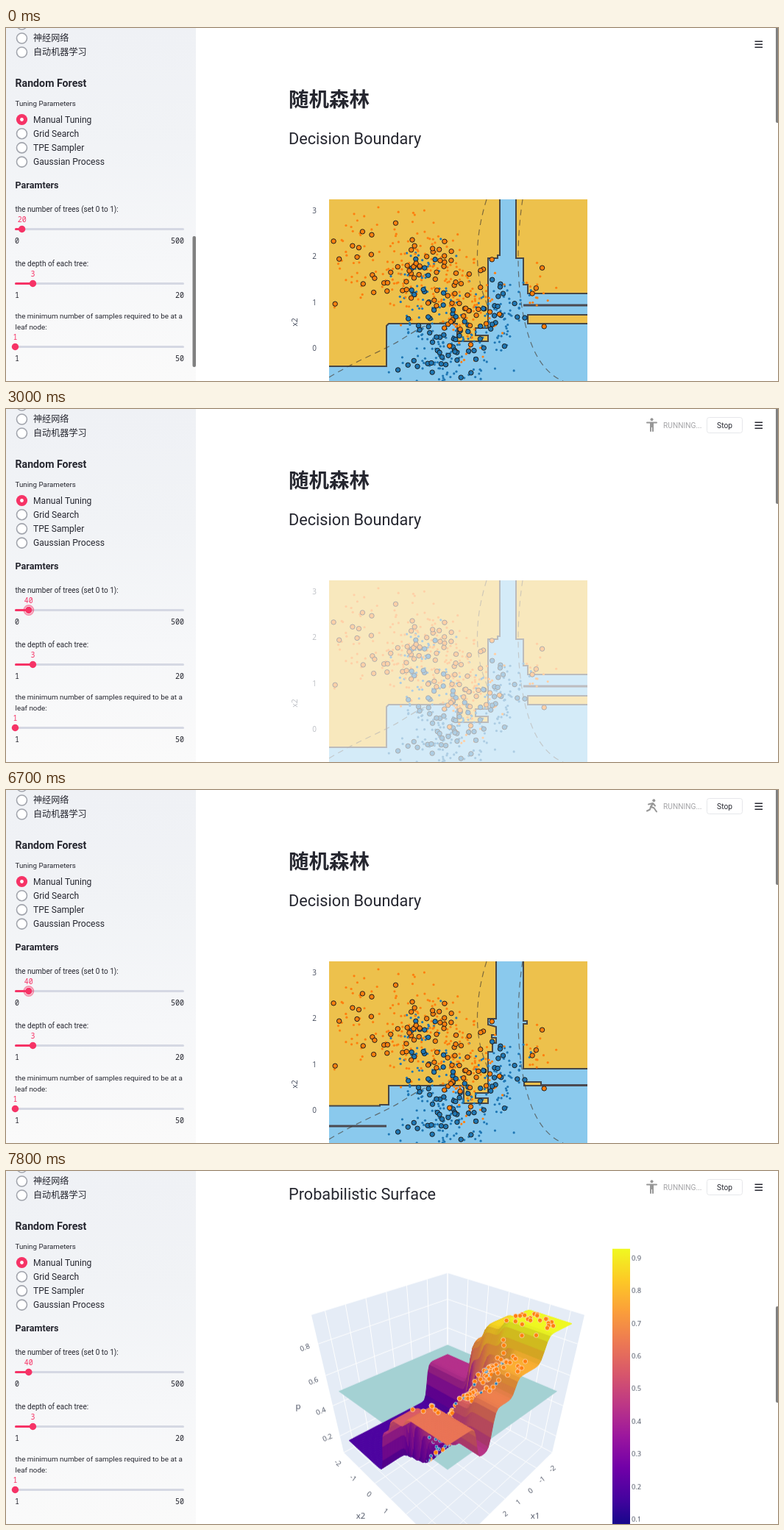
These frames come from a looping animation (1049x480 px, 8 s). An HTML page with a canvas:

```html
<!DOCTYPE html>
<html lang="en">
<head>
<meta charset="utf-8">
<title>Random Forest Tuning</title>
<style>
  html, body { margin: 0; width: 100%; height: 100%; overflow: hidden; background: #fff; }
  canvas { display: block; }
</style>
</head>
<body>
<canvas id="stage" width="1049" height="480"></canvas>
<script>
const W = 1049, H = 480, LOOP = 8000;
const stage = document.getElementById('stage').getContext('2d');
const PINK = '#f63366', INK = '#262730', AXIS = '#444b5c';
const ORANGE = '#ff7f0e', BLUE = '#1f77b4';
const SANS = 'Roboto, sans-serif', MONO = '"Noto Sans Mono", monospace';
const CJK = '"Noto Sans CJK SC", "Noto Sans CJK", sans-serif', PLOT = '"Open Sans", sans-serif';

const mix = (a, b, k) => a + (b - a) * k;
const range = (from, to, step) => Array.from({ length: Math.floor((to - from) / step) + 1 }, (_, i) => from + i * step);

// y is the vertical centre of the capitals
function text(g, str, x, y, size, { family = SANS, weight = 400, color = INK, align = 'left', turn = 0 } = {}) {
  g.save();
  g.translate(x, y);
  g.rotate(turn * Math.PI / 180);
  g.font = `${weight} ${size}px ${family}`;
  g.fillStyle = color;
  g.textAlign = align;
  g.fillText(str, 0, size * 0.36);
  g.restore();
}
function poly(g, points, fill, stroke) {
  g.beginPath();
  for (const [x, y] of points) g.lineTo(x, y);
  g.closePath();
  if (fill) { g.fillStyle = fill; g.fill(); }
  if (stroke) { g.strokeStyle = stroke; g.lineWidth = 1; g.stroke(); }
}
function strokePath(g, d, color, width) {
  g.strokeStyle = color;
  g.lineWidth = width;
  g.stroke(new Path2D(d));
}
function disc(g, x, y, r, fill, stroke, width = 1) {
  g.beginPath();
  g.arc(x, y, r, 0, 7);
  if (fill) { g.fillStyle = fill; g.fill(); }
  if (stroke) { g.strokeStyle = stroke; g.lineWidth = width; g.stroke(); }
}
function bar(g, x, y, w, h, r, fill, stroke) {
  g.beginPath();
  g.roundRect(x, y, w, h, r);
  if (fill) { g.fillStyle = fill; g.fill(); }
  if (stroke) { g.strokeStyle = stroke; g.lineWidth = 1; g.stroke(); }
}
function ramp(g, y0, y1, colors) {
  const grad = g.createLinearGradient(0, y0, 0, y1);
  colors.forEach((c, i) => grad.addColorStop(i / (colors.length - 1), c));
  return grad;
}
function cached(draw) {
  const c = document.createElement('canvas');
  c.width = W;
  c.height = 680;
  draw(c.getContext('2d'));
  return c;
}

// ---- samples: seeded clouds, every fourth one is a large ringed marker ----
let seed = 4711;
const random = () => (seed = (seed * 16807) % 2147483647) / 2147483647;
const gauss = () => Math.sqrt(-2 * Math.log(random())) * Math.cos(2 * Math.PI * random());
const cloud = (color, count, cx, cy, sx, sy) => range(1, count, 1)
  .map(i => ({ color, large: i % 4 === 0, x: cx + sx * gauss(), y: cy + sy * gauss() }));
const samples = [
  ...cloud(BLUE, 220, 598, 430, 32, 38), ...cloud(BLUE, 55, 560, 350, 18, 38), ...cloud(BLUE, 70, 676, 385, 15, 34),
  ...cloud(ORANGE, 165, 558, 328, 30, 36), ...cloud(ORANGE, 130, 628, 375, 18, 34),
  ...cloud(ORANGE, 45, 475, 312, 18, 28), ...cloud(ORANGE, 18, 722, 365, 10, 24)
];

// ---- decision boundary ----
const LEFT = 439, TOP = 233, SIDE = 351, BOTTOM = 592;
const before = {
  edges: ['439 460H517V405L520 402H613V426H655V418H638V408H655V313H668V309H671V233',
    '693 233V313H703V349H709V361H790', '790 390H709V402H790'],
  bars: 'M703 377H790'
};
const after = {
  edges: ['439 429.5H508V428H520V402H619L622 405V426H655V419H638V412H655V356H661V344H666V337H660V333H666V322L655 319V311H666V233',
    '703 233V314H708V318H703V379H790', '790 401.5H727V397H704V402H790'],
  bars: 'M439 457H517M727 401.5H790'
};

function drawBoundary(g, { edges, bars }) {
  const label = { family: PLOT, color: AXIS, align: 'center' };
  for (let v = 3; v >= -2; v--) text(g, v, 419, 248 + (3 - v) * 62.6, 10, label);
  for (let v = -2; v <= 2; v++) text(g, v, 614 + v * 62.6, BOTTOM + 13, 10, label);
  text(g, 'x2', 392, 400, 10.5, { ...label, turn: -90 });
  text(g, 'x1', 614, BOTTOM + 33, 10.5, label);

  g.beginPath();
  g.rect(LEFT, TOP, SIDE, BOTTOM - TOP);
  g.clip();
  g.fillStyle = '#edc14c';
  g.fillRect(LEFT, TOP, SIDE, BOTTOM - TOP);
  g.fillStyle = '#8ac9ed';
  g.fill(new Path2D(`M${edges.join('L')}V${BOTTOM}H${LEFT}Z`));
  strokePath(g, 'M' + edges.join('M'), '#474747', 2);
  strokePath(g, bars, '#4b4950', 3.2);
  g.setLineDash([8, 6]);
  strokePath(g, 'M653 233C640 275 638 310 643 340S658 375 655 395M439 475C480 450 510 440 535 425S570 400 600 400' +
    'M702 233C697 265 693 315 699 365S720 465 757 480', 'rgba(70,60,50,.65)', 1.2);
  g.setLineDash([]);
  for (const s of samples) if (!s.large) disc(g, s.x, s.y, 1.6, s.color);
  for (const s of samples) if (s.large) disc(g, s.x, s.y, 3.2, s.color, '#1c1c1c');
}

// ---- probability surface ----
const plasma = ['#0d0887', '#46039f', '#7201a8', '#9c179e', '#bd3786', '#d8576b', '#ed7953', '#fb9f3a', '#fdca26', '#f0f921'];
function plasmaAt(p, light) {
  const k = Math.min(8.999, Math.max(0, (p - 0.07) / 0.857 * 9)), i = Math.floor(k);
  const channel = at => mix(...[plasma[i], plasma[i + 1]].map(c => parseInt(c.slice(at, at + 2), 16)), k - i) * light;
  return `rgb(${channel(1)},${channel(3)},${channel(5)})`;
}

// unit cube to screen: a runs back to left, b runs back to right, h runs up
function cube(a, b, h) {
  const blend = (back, left, right, front) => mix(mix(back, left, a), mix(right, front, a), b);
  return [
    mix(blend(600, 459, 742, 600), blend(600, 415, 786, 600), h),
    mix(blend(330, 405, 405, 545), blend(161, 218, 218, 310), h)
  ];
}
const place = (u, v, p) => cube(0.04 + 0.92 * u, 0.04 + 0.92 * v, (p - 0.09) / 0.9);

// sums of soft steps, like an ensemble of shallow trees
const step = (x, at) => 1 / (1 + Math.exp((at - x) / 0.011));
function probability(u, v) {
  const low = 0.43 - 0.25 * step(u, 0.2);
  const high = 0.94 - 0.17 * step(u, 0.2) - 0.11 * step(u, 0.42) - 0.22 * step(u, 0.6) + 0.19 * step(u, 0.74);
  const edge = 0.37 + 0.16 * step(u, 0.22) - 0.16 * step(u, 0.74);
  const rise = 0.6 * step(v, edge) + 0.25 * step(v, edge + 0.1) + 0.15 * step(v, edge + 0.25);
  return mix(low, high, rise);
}

function drawSurface(g) {
  poly(g, [cube(1, 0, 1), cube(0, 0, 1), cube(0, 1, 1), cube(0, 1, 0), cube(1, 1, 0), cube(1, 0, 0)], '#e5ecf6');
  const rule = (...points) => strokePath(g, 'M' + points.map(p => p.join(' ')).join('L'), '#fff', 1);
  for (const h of [0.12, 0.34, 0.56, 0.79]) rule(cube(1, 0, h), cube(0, 0, h), cube(0, 1, h));
  for (const k of range(0, 0.9, 0.15)) {
    rule(cube(k, 0, 1), cube(k, 0, 0), cube(k, 1, 0));
    rule(cube(0, k, 1), cube(0, k, 0), cube(1, k, 0));
  }
  poly(g, [place(1, 0, 0.5), place(0, 0, 0.5), place(0, 1, 0.5), place(1, 1, 0.5)], '#a4d1d3');

  const N = 64, items = [];
  for (let i = 0; i < N; i++) for (let j = 0; j < N; j++) {
    const corners = [[i, j], [i + 1, j], [i + 1, j + 1], [i, j + 1]].map(([a, b]) => [a / N, b / N, probability(a / N, b / N)]);
    const heights = corners.map(c => c[2]);
    const slope = Math.max(...heights) - Math.min(...heights);
    const color = plasmaAt((heights[0] + heights[2]) / 2, 1 - Math.min(0.16, slope * 4));
    items.push({ depth: (i + j + 1) / N, draw: () => poly(g, corners.map(c => place(...c)), color, color) });
  }
  for (const s of samples.filter((s, i) => i % 2 === 0)) {
    const u = (s.x - LEFT) / SIDE, v = (BOTTOM - s.y) / (BOTTOM - TOP);
    if (v > 1 || u < 0) continue;
    const [x, y] = place(u, v, probability(u, v) + 0.01);
    const r = s.color === ORANGE ? 3.1 : 2.1;
    items.push({ depth: u + v + 0.04, draw: () => disc(g, x, y, r, s.color, 'rgba(255,255,255,.7)', 0.8) });
  }
  items.sort((a, b) => a.depth - b.depth).forEach(item => item.draw());

  const label = { family: PLOT, color: AXIS, align: 'center' };
  for (let k = 0; k < 5; k++) {
    const q = k * k;
    if (k < 4) {
      text(g, '0.' + (8 - 2 * k), 406 + 12.3 * k - 0.7 * q, 262 + 48 * k - 2.4 * q, 9.6, { ...label, turn: -22 });
      text(g, k - 2, 451 + 20.5 * k + 0.4 * q, 419 + 20 * k + 0.6 * q, 9.6, { ...label, turn: 38 });
    }
    text(g, k - 2, 742 - 13.5 * k - 0.6 * q, 427 + 14.5 * k + 0.2 * q, 9.6, { ...label, turn: -38 });
  }
  text(g, 'p', 397, 342, 11.5, label);
  text(g, 'x2', 482, 491, 11.5, label);
  text(g, 'x1', 719, 491, 11.5, label);

  g.fillStyle = ramp(g, 510, 128, plasma);
  g.fillRect(824, 128, 24, 382);
  for (let i = 1; i <= 9; i++) text(g, '0.' + i, 850, 140.5 + (9 - i) * 44.4, 9.4, { family: PLOT, color: AXIS });
}

const boundaries = [before, after].map(shape => cached(g => drawBoundary(g, shape)));
const surface = cached(drawSurface);

// ---- page furniture ----
function radio(y, name, family, on) {
  if (on) {
    disc(stage, 21.5, y, 7.6, PINK);
    disc(stage, 21.5, y, 2.4, '#fff');
  } else disc(stage, 21.5, y, 7, '#fff', '#a2a5ad', 1.6);
  text(stage, name, 37, y, 12.1, { family });
}
function slider(y, x, value, min, max, focused) {
  const mono = { family: MONO };
  bar(stage, 12, y - 1.5, 230, 3, 1.5, '#d5d8e3');
  bar(stage, 12, y - 1.5, x - 12, 3, 1.5, PINK);
  if (focused) disc(stage, x, y, 6.4, null, 'rgba(246,51,102,.5)', 2);
  disc(stage, x, y, 4.7, PINK);
  text(stage, value, x, y - 13.5, 10, { ...mono, color: PINK, align: 'center' });
  text(stage, min, 12, y + 15.5, 10, mono);
  text(stage, max, 242, y + 15.5, 10, { ...mono, align: 'right' });
}
function drawSidebar(trees, focused, hovered) {
  stage.fillStyle = ramp(stage, 0, H, ['#eff1f5', '#f1f3f6', '#f6f7f9', '#fafafa']);
  stage.fillRect(0, 0, 258, H);
  radio(-5, '', SANS);
  radio(14, '神经网络', CJK);
  radio(33, '自动机器学习', CJK);
  text(stage, 'Random Forest', 12.5, 74.5, 14.2, { weight: 700 });
  text(stage, 'Tuning Parameters', 12.5, 102, 9.8);
  ['Manual Tuning', 'Grid Search', 'TPE Sampler', 'Gaussian Process']
    .forEach((name, i) => radio(124.5 + i * 19.2, name, SANS, i === 0));
  text(stage, 'Paramters', 12.5, 213.5, 12.6, { weight: 700 });
  text(stage, 'the number of trees (set 0 to 1):', 12.5, 246, 10);
  slider(273.5, 12.5 + trees * 0.458, trees, 0, 500, focused);
  text(stage, 'the depth of each tree:', 12.5, 320, 10);
  slider(347.5, 36.5, 3, 1, 20);
  text(stage, 'the minimum number of samples required to be at a', 12.5, 391, 9.9);
  text(stage, 'leaf node:', 12.5, 406, 9.9);
  slider(433.5, 12.5, 1, 1, 50);
  if (hovered) bar(stage, 253.5, 283, 4.5, 178, 2, '#808080');
}

// standing, running, lunging, cycling
const poses = {
  S: 'M871 18.6H884M876 19V30M879 19V30M877.5 19V24',
  R: 'M878.5 18L877.5 23L880.5 25.5V30M872 22L873.5 19L879 17.5L881 20.5L884 21M877 23L875.5 27L871 26.5',
  L: 'M879.5 18.5L876 22.5L880.5 24.5L884 29.5M873 19.5L879 18L882 21.5M876 23L875 26.5L871 28.5',
  B: 'M878 18L875 21L878 23.5V27M878 18L880.5 21H884'
};
function drawRunner(pose) {
  const grey = '#979797';
  stage.lineCap = stage.lineJoin = 'round';
  disc(stage, pose === 'S' ? 877.5 : 880.3, 14.2, 2, grey);
  strokePath(stage, poses[pose], grey, 2);
  if (pose === 'B') for (const x of [871.6, 883.6]) disc(stage, x, 26, 3.7, null, grey, 1.5);
  stage.lineCap = 'butt';
  stage.lineJoin = 'miter';
}
function drawHeader(pose, scroll) {
  if (pose) {
    drawRunner(pose);
    text(stage, 'RUNNING...', 893, 22.5, 10.2, { color: '#a5a5a8' });
    bar(stage, 952.5, 11.5, 48, 21, 3, '#fff', '#e6e7ea');
    text(stage, 'Stop', 976.5, 22, 10.2, { align: 'center' });
  }
  strokePath(stage, 'M1017.5 18.3H1028M1017.5 22.3H1028M1017.5 26.3H1028', INK, 1.6);
  bar(stage, 1046, scroll * 0.2727 - 2, 4, 131, 2, '#808080');
}

function drawPage(scroll, fade, headingFade, tuned) {
  stage.save();
  stage.translate(0, -scroll);
  text(stage, '随机森林', 384, 97, 27.5, { family: CJK, weight: 700 });
  stage.globalAlpha = headingFade;
  text(stage, 'Decision Boundary', 384, 150.5, 21.7);
  stage.globalAlpha = fade;
  stage.drawImage(boundaries[+tuned], 0, 0);
  stage.globalAlpha = 1;
  text(stage, 'oob score', 384, 662.5, 12.2, { weight: 700 });
  text(stage, ': 0.755', 440, 662.5, 12.2);
  text(stage, 'Probabilistic Surface', 384, 713, 21.7);
  stage.drawImage(surface, 0, 660);
  stage.restore();
}

// ---- timeline: the picture advances in ticks, the runner changes pose on each ----
const RUN = 1800, TUNED = 4400, SCROLL = 7000;
const runTicks = [...range(RUN, 4000, 200), ...range(TUNED, 5600, 200), ...range(6000, 6700, 175), ...range(SCROLL, 7800, 200)];
const runPoses = 'LSLSRLSRLSLR' + 'SRLSRLR' + 'BSRSL' + 'RBRLS';
const ticks = [0, 800, 1000, 1200, ...runTicks];
const latest = (list, t) => list.findLastIndex(v => v <= t);

function render(now) {
  const t = ticks[latest(ticks, now % LOOP)];
  const trees = Math.min(40, Math.max(20, 20 + (t - 800) / 20));
  const tuned = t >= TUNED;
  const progress = Math.min(1, Math.max(0, (t - 2030) / 1000));
  const fade = tuned ? 1 : 1 - 0.67 * progress ** 1.6;
  const scroll = t < SCROLL ? 0 : 682.3 * (1 - Math.exp((SCROLL - 50 - t) * 0.0136));

  stage.fillStyle = '#fff';
  stage.fillRect(0, 0, W, H);
  drawPage(scroll, fade, t < 3000 ? fade : 1, tuned);
  drawSidebar(trees, t >= 800 && t < SCROLL, t < 2000);
  drawHeader(runPoses[latest(runTicks, t)], scroll);
}
function loop() {
  render(performance.now());
  requestAnimationFrame(loop);
}
loop();
</script>
</body>
</html>
```
